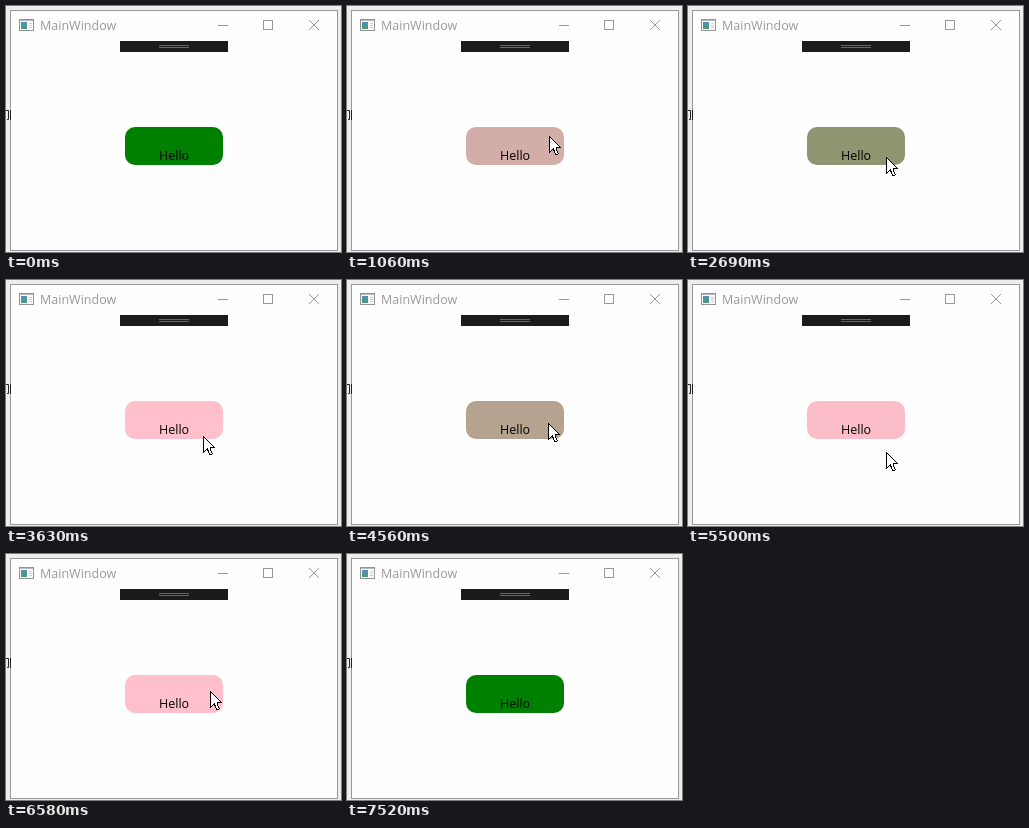
An HTML page for the animation above (7790 ms loop, 335x246 px).

```html
<!DOCTYPE html>
<html lang="en">
<head>
<meta charset="utf-8">
<title>Hover button</title>
<style>
  html, body { margin: 0; width: 100%; height: 100%; overflow: hidden; background: #ededed; }
  svg { display: block; }
  text { font: 12.5px "Open Sans", "Noto Sans", sans-serif; }
</style>
</head>
<body>
<svg width="335" height="246" viewBox="0 0 335 246">
  <defs>
    <linearGradient id="pane" x1="0" y1="0" x2="0" y2="1">
      <stop offset="0" stop-color="#4f8fc0"/>
      <stop offset="1" stop-color="#4b9a78"/>
    </linearGradient>
  </defs>
  <rect width="335" height="246" fill="#ededed"/>
  <rect x="4.5" y="4.5" width="327" height="240" fill="#fefefe" stroke="#989898"/>
  <path d="M0 104.5H2.5V113.5H1M4.5 104V114" fill="none" stroke="#222"/>

  <!-- title bar -->
  <rect x="13.5" y="13.5" width="14" height="11" fill="#fafafa" stroke="#939393"/>
  <path d="M14 14.5H27" stroke="#bbb"/>
  <rect x="15" y="16" width="6" height="7" fill="url(#pane)"/>
  <path d="M23 17.5H26M23 19.5H26M23 21.5H26" stroke="#d0d0d0"/>
  <text x="34" y="24" fill="#999">MainWindow</text>
  <g fill="none" stroke="#999">
    <path d="M212 19.5H222"/>
    <rect x="257.5" y="14.5" width="9" height="9"/>
    <path d="M303 14L313 24M313 14L303 24"/>
  </g>

  <!-- docked toolbar -->
  <rect x="114" y="35" width="108" height="11" fill="#1b1b1c"/>
  <path d="M153 39.5H183M153 41.5H183" stroke="#666"/>

  <rect id="button" x="119" y="121" width="98" height="38" rx="10" fill="#008000"/>
  <text x="153" y="154" fill="#000">Hello</text>

  <path id="cursor" d="M.5 .5V16.5L4.3 12.9L6.8 18.5H8.5L9.2 17.5L7 12.5V11.5H11.5Z"
        fill="#fff" stroke="#000" shape-rendering="crispEdges" visibility="hidden"/>
</svg>
<script>
const LOOP = 7790;
const FIRST = 400, STEP = 134.3, LEAD = 20; // screen refresh rhythm
const FADE = 400;
const GREEN = [0, 128, 0], PINK = [255, 192, 203];
const POINTER_SHOWN = [400, 7450];

// Turning points of the pointer: time, x, y.
const TURNS = [
  [100, 166, 240], [1100, 202, 130], [1540, 202, 130], [2240, 196, 184],
  [3000, 199, 132], [3300, 199, 132], [4040, 195, 191], [4720, 202, 136],
  [5070, 202, 136], [5790, 196, 191], [6300, 204, 137], [6560, 204, 137],
  [6900, 200, 157], [7370, 236, 236]
];

// Hover periods: enter, leave.
const HOVERS = [[810, 1946], [2575, 3690], [4379, 5489], [6140, 7000]];

const button = document.getElementById("button");
const cursor = document.getElementById("cursor");
const clamp = v => Math.min(1, Math.max(0, v));
const mix = (a, b, k) => a + (b - a) * k;
const ease = k => (1 - Math.cos(Math.PI * clamp(k))) / 2;

// Colours blend in linear light.
const toLinear = c => c / 255 <= 0.04045 ? c / 255 / 12.92 : ((c / 255 + 0.055) / 1.055) ** 2.4;
const toByte = v => Math.round(255 * (v <= 0.0031308 ? v * 12.92 : 1.055 * v ** (1 / 2.4) - 0.055));
const blend = (from, to, k) => from.map((c, i) => toByte(mix(toLinear(c), toLinear(to[i]), k)));

function pointerAt(t) {
  const found = TURNS.findIndex(turn => turn[0] > t);
  const next = found < 0 ? TURNS.length - 1 : Math.max(1, found);
  const [t0, x0, y0] = TURNS[next - 1], [t1, x1, y1] = TURNS[next];
  const k = ease((t - t0) / (t1 - t0));
  return [mix(x0, x1, k), mix(y0, y1, k)].map(Math.round);
}

const hoverAt = t => clamp(HOVERS.reduce((sum, [enter, leave]) =>
  sum + clamp((t - enter) / FADE) - clamp((t - leave) / FADE), 0));

function draw(time) {
  const t = FIRST + STEP * Math.floor((time - FIRST + LEAD) / STEP);
  const shown = t >= POINTER_SHOWN[0] && t < POINTER_SHOWN[1];
  button.setAttribute("fill", `rgb(${blend(GREEN, PINK, hoverAt(t))})`);
  cursor.setAttribute("visibility", shown ? "visible" : "hidden");
  cursor.setAttribute("transform", `translate(${pointerAt(t)})`);
}

const start = performance.now();
function loop() {
  draw((performance.now() - start) % LOOP);
  requestAnimationFrame(loop);
}
loop();
</script>
</body>
</html>
```
